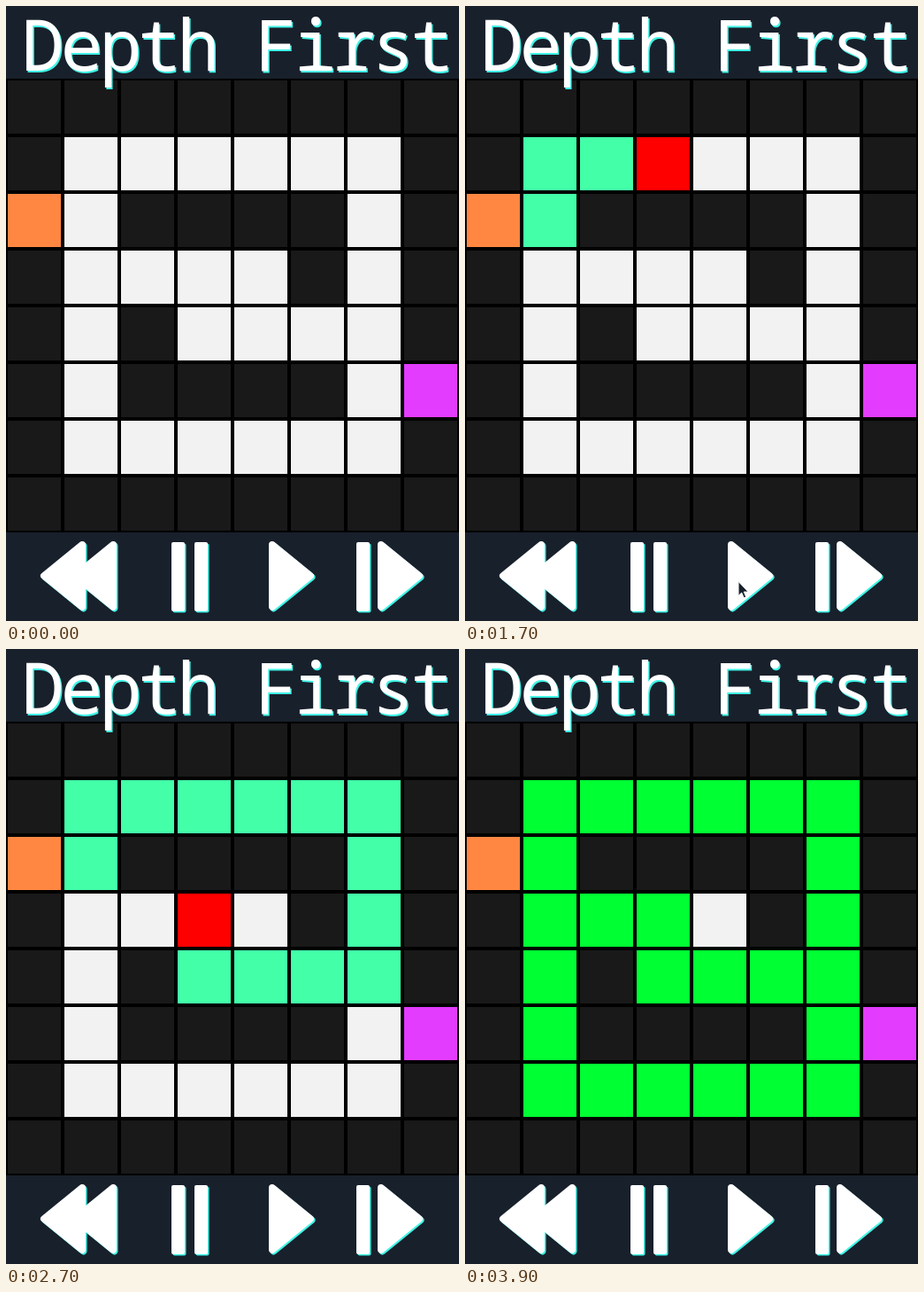
These frames come from a looping animation (512x694 px, 5000 ms). An HTML page:

```html
<!DOCTYPE html>
<html lang="en">
<head>
<meta charset="utf-8">
<title>Depth First</title>
<style>
  html, body { margin: 0; width: 100%; height: 100%; overflow: hidden; background: #18202b; }
  svg { display: block; width: 512px; height: 694px; }
  .title { font: 300 80px "Noto Sans Mono", "DejaVu Sans Mono", monospace; letter-spacing: -4px; white-space: pre; }
  .tri { stroke-width: 8; stroke-linejoin: round; }
</style>
</head>
<body>
<svg viewBox="0 0 512 694">
  <defs>
    <path id="tri" class="tri" d="M4 4L47 39L4 74Z"/>
    <rect id="bar" width="15" height="78" rx="2"/>
    <g id="rewind">
      <use href="#tri" transform="translate(90 604) scale(-1 1)"/>
      <use href="#tri" transform="translate(125 604) scale(-1 1)"/>
    </g>
    <g id="pause"><use href="#bar" x="187" y="605"/><use href="#bar" x="213" y="605"/></g>
    <g id="play"><use href="#tri" x="297" y="604"/></g>
    <g id="step"><use href="#bar" x="396" y="605"/><use href="#tri" x="420" y="604"/></g>
    <text id="title" class="title" x="17.5" y="73">Depth First</text>
  </defs>
  <rect width="512" height="694" fill="#18202b"/>
  <rect y="82" width="512" height="512"/>
  <g id="grid"></g>
  <g id="labels"></g>
  <path id="cursor" d="M0 0V16L3.7 12.6L6.2 18.4L8.7 17.3L6.2 11.6H11.2Z"
        fill="#18202b" stroke="#fff" stroke-width="1" stroke-linejoin="round"/>
</svg>
<script>
const LOOP = 5000, STEP = 100, SEARCH = 1400, DONE = 3900;
const COLOR = {
  wall: '#191919', open: '#f2f2f2', seen: '#42ffa8', head: '#ff0000',
  path: '#00ff33', start: '#ff8742', goal: '#e33cff'
};
const MAZE = [
  '########',
  '#......#',
  'S.####.#',
  '#....#.#',
  '#.#....#',
  '#.####.G',
  '#......#',
  '########'
];
const KIND = { '#': 'wall', '.': 'open', S: 'start', G: 'goal' };

const $ = id => document.getElementById(id);
function add(parent, tag, attrs) {
  const el = document.createElementNS('http://www.w3.org/2000/svg', tag);
  for (const k in attrs) el.setAttribute(k, attrs[k]);
  return parent.appendChild(el);
}

const cells = MAZE.map((row, r) => [...row].map((ch, c) => add($('grid'), 'rect', {
  x: c * 64 + 2, y: r * 64 + 84, width: 60, height: 60, fill: COLOR[KIND[ch]]
})));

// White shape over a cyan offset copy
const labels = {};
for (const id of ['title', 'rewind', 'pause', 'play', 'step']) {
  const g = labels[id] = add($('labels'), 'g', {});
  add(g, 'use', { href: '#' + id, x: 1.5, y: 1.5, fill: '#3ff3e6', stroke: '#3ff3e6', 'stroke-width': 0 });
  add(g, 'use', { href: '#' + id, fill: '#fff', stroke: '#fff', 'stroke-width': 0 });
}

// Search order, walked from the cell beside the start
const DIR = { U: [0, -1], D: [0, 1], L: [-1, 0], R: [1, 0] };
const route = [[1, 2]];
for (const d of 'URRRRRDDDLLLULLDDDRRRRRU') {
  const [x, y] = route[route.length - 1];
  route.push([x + DIR[d][0], y + DIR[d][1]]);
}

// Cursor keys: time, x, y
const MOVES = [
  [400, 307, 685], [500, 306, 675], [600, 306, 665], [700, 307, 657], [800, 308, 652], [900, 309, 649.5],
  [1800, 309, 653], [1900, 308, 661], [2000, 307, 671], [2100, 306, 681], [2200, 306, 690], [2300, 306, 720]
];

function draw(t) {
  const head = Math.floor((t - SEARCH) / STEP);
  route.forEach(([x, y], i) => {
    const state = t >= DONE ? 'path' : i < head ? 'seen' : i === head ? 'head' : 'open';
    cells[y][x].setAttribute('fill', COLOR[state]);
  });

  const pressed = t >= 1200 && t < 1300;
  labels.play.style.filter = pressed ? 'brightness(0.6)' : 'none';

  const key = MOVES.filter(m => m[0] <= t).pop();
  $('cursor').setAttribute('visibility', key ? 'visible' : 'hidden');
  if (key) $('cursor').setAttribute('transform', `translate(${key[1]} ${key[2]})`);
}

const t0 = performance.now();
function tick() {
  draw((performance.now() - t0) % LOOP);
  requestAnimationFrame(tick);
}
draw(0);
requestAnimationFrame(tick);
</script>
</body>
</html>
```
